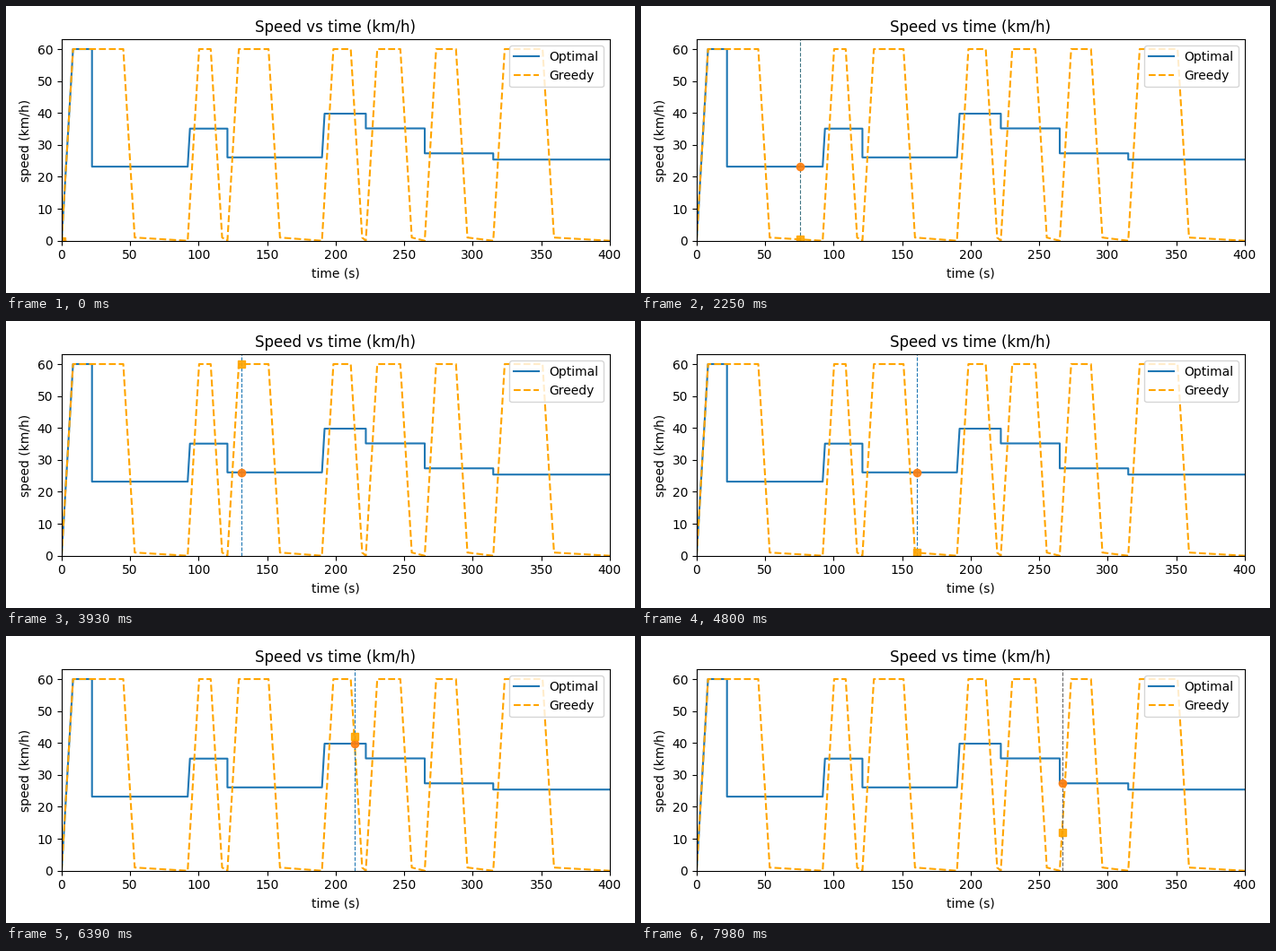
Recreate the animation shown at these times as a matplotlib script. Size 700 by 320 pixels, loop 8 s.

```python
import math

import matplotlib.pyplot as plt
import numpy as np
from matplotlib.animation import FuncAnimation

FRAMES = 267
LOOP_MS = 8000
T_END = 400
V_MAX = 60      # km/h
ACC = 7.2       # km/h per second
CREEP = 1       # km/h while waiting for the light

# Passing times (s) and lengths (m) of the stretches between lights
LIGHTS = [0, 92, 121, 190, 222, 265, 315, 400]
LENGTHS = [750, 280, 500, 350, 420, 380, 600]
FIRST_LIGHT = 300


def greedy_profile():
    """Full throttle, brake for the light, then creep up to it."""
    ramp = V_MAX / ACC
    pts = [(0, 0)]
    for start, end, length in zip(LIGHTS, LIGHTS[1:], LENGTHS):
        brake = start + length * 3.6 / V_MAX
        pts += [(start + ramp, V_MAX), (brake, V_MAX),
                (brake + ramp, CREEP), (end, 0)]
    return np.array(pts).T


def optimal_profile():
    """One constant speed per stretch so that each light is just green."""
    ramp = V_MAX / ACC
    t_first = FIRST_LIGHT * 3.6 / V_MAX + ramp / 2
    times = [0, t_first] + LIGHTS[1:]
    lengths = [FIRST_LIGHT, LENGTHS[0] - FIRST_LIGHT] + LENGTHS[1:]
    speed = 0
    pts = [(0, 0)]
    for start, end, length in zip(times, times[1:], lengths):
        span, dist = end - start, length * 3.6
        gap = dist - speed * span
        if gap > 0:
            rise = ACC * (span - math.sqrt(span ** 2 - 2 * gap / ACC))
            speed += rise
            pts.append((start + rise / ACC, speed))
        else:
            speed = dist / span
            pts.append((start, speed))
        pts.append((end, speed))
    return np.array(pts).T


def cursor_color(t):
    if t < 55:
        return "#666666"
    if t < 100:
        return "#3f7583"
    return "#1f77b4" if t < 250 else "#666666"


opt_t, opt_v = optimal_profile()
gre_t, gre_v = greedy_profile()

fig, ax = plt.subplots(figsize=(7, 3.2), dpi=100)
ax.plot(opt_t, opt_v, color="tab:blue", label="Optimal")
ax.plot(gre_t, gre_v, "--", color="orange", label="Greedy")
cursor = ax.axvline(0, ls="--", lw=0.8)
opt_dot, = ax.plot([0], [0], "o", color="tab:orange", alpha=0.9)
gre_dot, = ax.plot([0], [0], "s", color="orange", alpha=0.9)
ax.set(xlim=(0, T_END), ylim=(0, 63), xlabel="time (s)",
       ylabel="speed (km/h)", title="Speed vs time (km/h)")
ax.legend(loc="upper right")
fig.tight_layout()


def update(i):
    t = i * T_END / (T_END - 1)
    cursor.set_xdata([t, t])
    cursor.set_color(cursor_color(t))
    opt_dot.set_data([t], [np.interp(t, opt_t, opt_v)])
    gre_dot.set_data([t], [np.interp(t, gre_t, gre_v)])
    return cursor, opt_dot, gre_dot


anim = FuncAnimation(fig, update, frames=FRAMES, interval=LOOP_MS / FRAMES,
                     repeat=True, repeat_delay=0)
plt.show()
```
